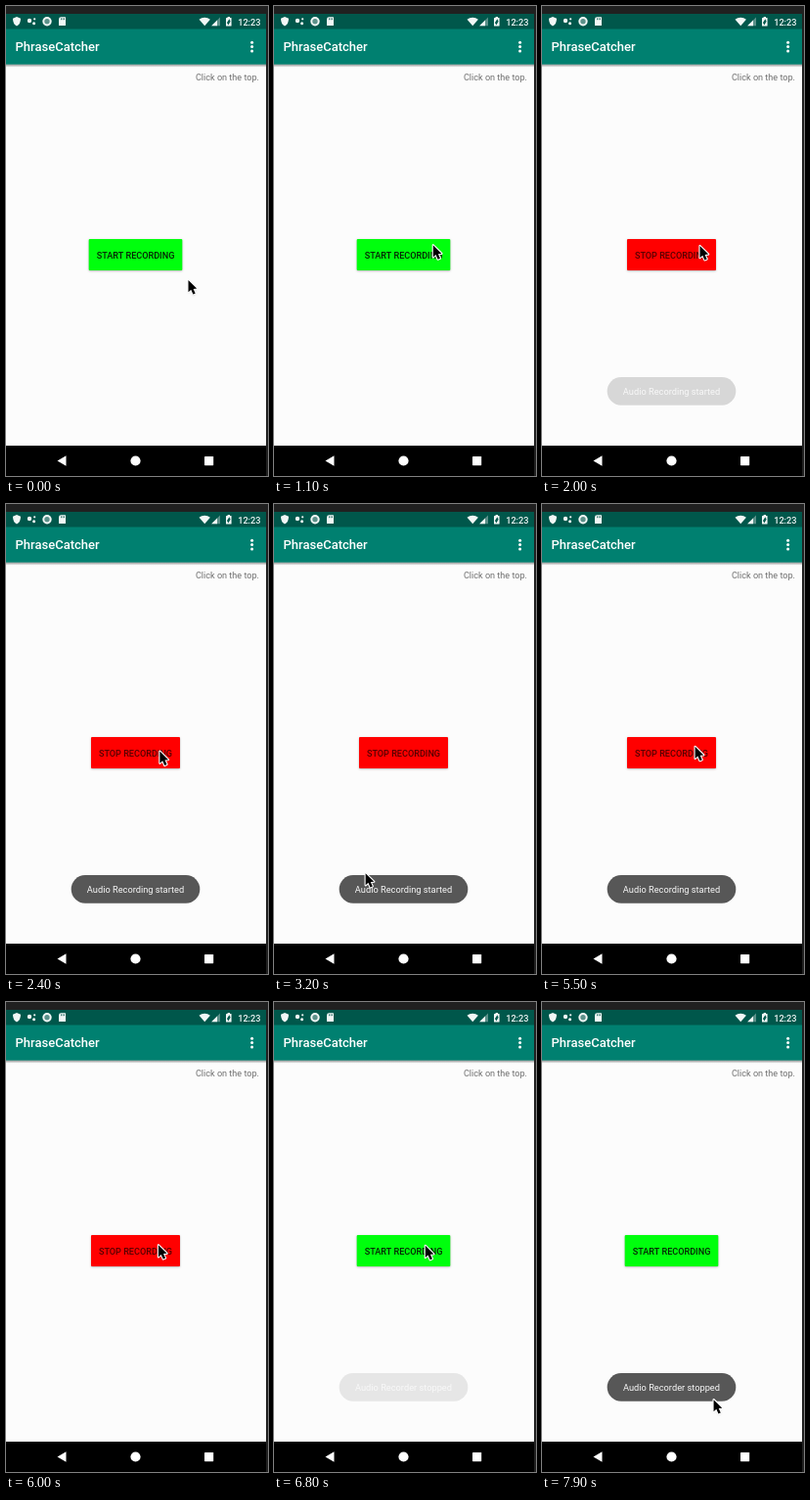
An HTML page with a canvas that plays this animation: 268 px wide and 480 px high, repeating every 8 s.

```html
<!DOCTYPE html>
<html lang="en">
<head>
<meta charset="utf-8">
<title>Recorder demo</title>
<style>
html, body { margin: 0; width: 100%; height: 100%; overflow: hidden; background: #000; }
canvas { display: block; width: 268px; height: 480px; }
</style>
</head>
<body>
<canvas id="stage"></canvas>
<script>
const W = 268, H = 480, LOOP = 8000, STEP = 100;
const SCREEN = 266, MIDDLE = 132.5;
const STATUS = '#00574b', BAR = '#008070', LIGHT = '#f2f7f6';

const canvas = document.getElementById('stage');
const ctx = canvas.getContext('2d');
const scale = window.devicePixelRatio || 1;
canvas.width = W * scale;
canvas.height = H * scale;

const ramp = (t, start, length) => Math.max(0, Math.min(1, (t - start) / length));
const ease = (t, start, length) => {
  const u = ramp(t, start, length);
  return u * u * (3 - 2 * u);
};
const mix = (a, b, u) => a.map((v, i) => v + (b[i] - v) * u);

// Angles in degrees; a positive speed runs clockwise around the toast.
function orbit(t, radius, angle, speed) {
  const a = (angle + speed * t) * Math.PI / 180;
  return [126 + radius * Math.cos(a), 400 + 27 * Math.sin(a)];
}

function pointerAt(t) {
  const rest = [163.8 - 0.0014 * t, 242.4 + 0.0008 * t];
  let p = mix([186, 279], rest, ease(t, 0, 900));
  p = mix(p, orbit(t - 3200, 70, 242, 0.447), ease(t, 2300, 700) - ease(t, 4700, 700));
  return mix(p, orbit(t - 7900, 50, 11, -0.3), ease(t, 7000, 450));
}

function rect(x, y, w, h, color) {
  ctx.fillStyle = color;
  ctx.fillRect(x, y, w, h);
}

function shape(points, color) {
  ctx.beginPath();
  points.forEach(([x, y]) => ctx.lineTo(x, y));
  ctx.closePath();
  ctx.fillStyle = color;
  ctx.fill();
}

function disc(x, y, r, color) {
  ctx.beginPath();
  ctx.arc(x, y, r, 0, 2 * Math.PI);
  ctx.fillStyle = color;
  ctx.fill();
}

function rounded(x, y, w, h, r, color) {
  ctx.beginPath();
  ctx.roundRect(x, y, w, h, r);
  ctx.fillStyle = color;
  ctx.fill();
}

function corner(x, y, size, color) {
  shape([[x, y], [x, y - size], [x - size, y]], color);
}

function text(str, x, y, size, color, align = 'left', weight = 400) {
  ctx.font = `${weight} ${size}px Roboto, sans-serif`;
  ctx.textAlign = align;
  ctx.fillStyle = color;
  ctx.fillText(str, x, y);
}

function shadow(alpha, blur, drop) {
  ctx.shadowColor = `rgba(0,0,0,${alpha})`;
  ctx.shadowBlur = blur * scale;
  ctx.shadowOffsetY = drop * scale;
}

function statusIcons() {
  // Shield
  ctx.beginPath();
  ctx.moveTo(11, 11);
  ctx.lineTo(15, 12.7);
  ctx.quadraticCurveTo(15, 18.5, 11, 20.5);
  ctx.quadraticCurveTo(7, 18.5, 7, 12.7);
  ctx.fillStyle = LIGHT;
  ctx.fill();

  // Assistant dots
  disc(24, 15, 2.2, LIGHT);
  disc(29.2, 13.3, 1.1, LIGHT);
  disc(28.6, 17.8, 1.5, LIGHT);

  // Record ring
  disc(42, 15.7, 4.7, LIGHT);
  disc(42, 15.7, 2.7, '#5c918a');

  // Memory card
  rounded(54, 11.3, 7, 8.8, [2.4, 0.5, 0.5, 0.5], LIGHT);
  for (let i = 0; i < 3; i++) rect(56.2 + 1.5 * i, 12.4, 0.7, 1.8, STATUS);

  // Wi-Fi
  ctx.beginPath();
  ctx.moveTo(203.2, 20.3);
  ctx.arc(203.2, 20.3, 8.6, -Math.PI * 0.73, -Math.PI * 0.27);
  ctx.fillStyle = LIGHT;
  ctx.fill();

  // Signal
  corner(219, 20.2, 8.8, '#5c918a');
  shape([[210.2, 20.2], [216, 14.4], [216, 20.2]], LIGHT);

  // Battery
  rounded(225, 12, 5.6, 8.6, 0.6, LIGHT);
  rect(226.6, 11, 2.4, 1.2, LIGHT);
  shape([[228.4, 13.3], [226, 17], [227.4, 19.4], [229.6, 15.8]], STATUS);
}

function chrome() {
  rect(0, 0, W, H, '#202020');
  rect(0, 8, SCREEN, 441, '#fcfcfc');
  rect(0, 8, SCREEN, 16, STATUS);
  rect(0, 23.5, SCREEN, 36.2, BAR);
  const shade = ctx.createLinearGradient(0, 59.7, 0, 62.7);
  shade.addColorStop(0, 'rgba(0,0,0,.4)');
  shade.addColorStop(1, 'rgba(0,0,0,0)');
  rect(0, 59.7, SCREEN, 3, shade);

  statusIcons();
  text('12:23', 260.5, 19.6, 9.2, LIGHT, 'right', 500);
  text('PhraseCatcher', 9.5, 46, 13, '#fff', 'left', 500);
  for (let i = -1; i <= 1; i++) disc(251.6, 41.6 + 4.3 * i, 1.5, '#fff');
  text('Click on the top.', 259, 76, 9.1, '#707070', 'right');

  rect(0, 449, SCREEN, 31, '#000');
  shape([[52.5, 464.5], [61.5, 459.3], [61.5, 469.7]], '#fff');
  disc(MIDDLE, 464.5, 5.1, '#fff');
  rounded(203, 460, 9.2, 9.2, 0.6, '#fff');
}

function button(recording) {
  const [label, width, fill, ink] = recording
    ? ['STOP RECORDING', 91, '#ff0000', '#560000']
    : ['START RECORDING', 95.6, '#00ff0d', '#062206'];
  ctx.save();
  shadow(0.3, 2, 0.8);
  rounded(MIDDLE - width / 2, 238, width, 32, 1, fill);
  ctx.restore();
  text(label, MIDDLE, 257.8, 9.1, ink, 'center', 500);
}

function toast(message, alpha) {
  if (alpha <= 0) return;
  ctx.globalAlpha = alpha;
  rounded(66.7, 379, 131.6, 28.7, 14.3, '#575757');
  ctx.globalAlpha = 1;
  text(message, MIDDLE, 397.2, 9.25, '#f8f8f8', 'center');
}

function pointer([x, y]) {
  ctx.save();
  ctx.translate(x, y);
  ctx.lineWidth = 2.2;
  ctx.lineJoin = 'round';
  ctx.strokeStyle = '#fff';
  const arrow = [[0.5, 1], [0.5, 13.2], [3.3, 10.7], [5.4, 15.4], [7.7, 14.4], [5.6, 9.9], [9.2, 9.6]];
  shadow(0.3, 2, 1);
  shape(arrow, '#000');
  shadow(0, 0, 0);
  ctx.stroke();
  ctx.fill();
  ctx.restore();
}

function draw(now) {
  const t = Math.floor((now % LOOP) / STEP) * STEP;
  ctx.setTransform(scale, 0, 0, scale, 0, 0);
  chrome();
  button(t >= 1800 && t < 6700);
  toast('Audio Recording started', ramp(t, 1910, 400) - ramp(t, 5650, 350));
  toast('Audio Recorder stopped', ramp(t, 6745, 400));
  pointer(pointerAt(t));
}

const start = performance.now();
function tick() {
  draw(performance.now() - start);
  requestAnimationFrame(tick);
}
tick();
</script>
</body>
</html>
```
